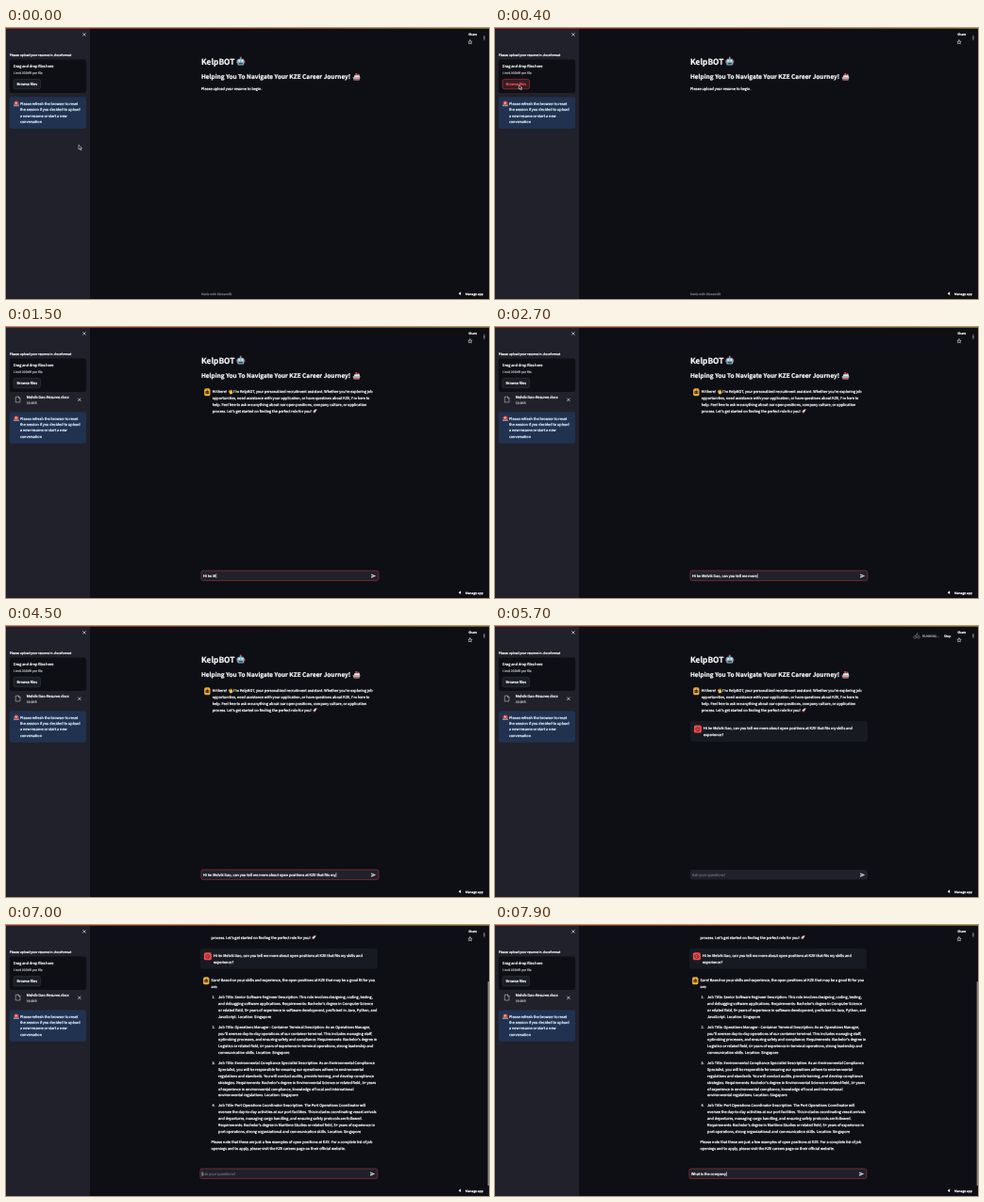
Animation of 512x288 px, one loop 8000 ms. Source, as an HTML page:

```html
<!DOCTYPE html>
<html lang="en">
<head>
<meta charset="utf-8">
<title>Resume chat assistant</title>
<style>
  html, body { margin: 0; width: 100%; height: 100%; overflow: hidden; background: #0d0f15; }
  svg { display: block; width: 100vw; height: 100vh; }
  text {
    font-family: "Noto Sans CJK JP", "Noto Sans CJK SC", "Noto Sans CJK", "Noto Sans", sans-serif;
    color: #fafafa; fill: currentColor; stroke: currentColor; stroke-width: .8;
    white-space: pre; text-rendering: geometricPrecision;
  }
</style>
</head>
<body>
<svg id="stage" viewBox="0 0 1920 1080" xmlns="http://www.w3.org/2000/svg"></svg>
<script>
const LOOP = 8000;
const LINE = 25.6;
const FONT_SCALE = 0.895;
const QUESTION = "Hi Im Melvik Dao, can you tell me more about open positions at KZE that fits my skills and experience?";
const FOLLOW_UP = "What is the company";

const T = {
  click: 250, file: 700, greeting: 900, ready: 1000, focus: 1200,
  submit: 5500, answer: 5800, refocus: 7000, retype: 7100
};

// Markup helpers
const text = (x, y, str, size = 16, attrs = "") =>
  `<text x="${x}" y="${y}" font-size="${size * FONT_SCALE}" ${attrs}>${str}</text>`;
const lines = (x, y, rows, step = LINE, attrs = "") =>
  rows.map((row, i) => text(x, y + i * step, row, 16, attrs)).join("");
const box = (x, y, w, h, fill, r = 8, attrs = "") =>
  `<rect x="${x}" y="${y}" width="${w}" height="${h}" rx="${r}" fill="${fill}" ${attrs}/>`;
const at = (x, y, body, attrs = "") => `<g transform="translate(${x} ${y})" ${attrs}>${body}</g>`;
const stroke = (d, color = "#fafafa", width = 2) =>
  `<path d="${d}" fill="none" stroke="${color}" stroke-width="${width}" stroke-linecap="round" stroke-linejoin="round"/>`;
const shape = (d, fill) => `<path d="${d}" fill="${fill}"/>`;
const dot = (x, y, r, fill) => `<circle cx="${x}" cy="${y}" r="${r}" fill="${fill}"/>`;
const cross = (x, y) => at(x, y, stroke("M-5-5L5 5M5-5L-5 5", "#fafafa", 2.4));

const robot =
  box(-17, -4, 6, 13, "#d9534f", 3) + box(11, -4, 6, 13, "#d9534f", 3) +
  dot(0, -14, 4, "#d9534f") + box(-2, -12, 4, 6, "#b8c4cc", 0) +
  box(-13, -9, 26, 25, "#7fb6cc", 5) +
  dot(-6, -1, 3.5, "#e8f6fa") + dot(6, -1, 3.5, "#e8f6fa") + box(-8, 7, 16, 5, "#324650", 1);
const ship =
  box(-4, -15, 7, 9, "#d94a45", 1) + box(5, -12, 6, 7, "#d94a45", 1) +
  box(-9, -7, 22, 10, "#e3e8ec", 2) + shape("M-15 1H16L11 13H-10Z", "#aab4bd") +
  shape("M-13 8H13L11 13H-10Z", "#c9413e");
const wave =
  `<g transform="rotate(-25)">${box(-6, -3, 13, 12, "#f5bd3d", 5)}` +
  [-6, -2.5, 1, 4.5].map((x, i) => box(x, -9 + Math.abs(i - 1.5), 3, 11, "#f5bd3d", 1.5)).join("") + "</g>";
const rocket =
  `<g transform="rotate(45)">${shape("M0-11Q6-5 4 6H-4Q-6-5 0-11Z", "#d5dae0")}` +
  shape("M-4 1L-8 8L-4 6ZM4 1L8 8L4 6ZM0-11L3-6H-3Z", "#d9453f") + shape("M-2 6H2L0 11Z", "#f6a623") + "</g>";
const siren =
  shape("M-9 5V-3Q-9-11 0-11T9-3V5Z", "#ea4338") + box(-11, 4, 22, 6, "#8a939e", 1) + dot(-1, -3, 3.5, "#ffc4ba");
const botAvatar =
  box(-12, -15, 24, 30, "#eda934", 7) + box(-7, -5, 14, 11, "#3b2b12", 3) +
  dot(-3, 0, 1.8, "#eda934") + dot(3, 0, 1.8, "#eda934") + box(-1, -10, 2, 6, "#3b2b12", 0);
const userAvatar =
  box(-15, -15, 30, 30, "#f04c4c", 7) +
  stroke("M-7-4Q0-11 7-4V2Q6 8 0 8T-7 2Z", "#3c1218", 2.4) + dot(-3, 1, 1.5, "#3c1218") + dot(3, 1, 1.5, "#3c1218");
const runner = dot(4, -9, 2.6, "#85878e") +
  stroke("M2-5L-2 2L4 5L2 11M-2 2L-5 7H-10M-7-1L-4-5H2L6-1H10", "#85878e", 2.2);
const cyclist = dot(3, -9, 2.4, "#85878e") +
  `<g fill="none" stroke="#85878e" stroke-width="2"><circle cx="-7" cy="6" r="5"/><circle cx="8" cy="6" r="5"/></g>` +
  stroke("M1-5L-5-1L1 2L0 7M1-5L5-1H9", "#85878e", 2);

const sidebar =
  box(0, 0, 334, 1080, "#20212a", 0) + cross(311, 26) +
  text(14, 114, "Please upload your resume in .docxformat", 14) +
  box(14, 126, 305, 133, "#0d0f15") +
  text(30, 159, "Drag and drop files here") +
  text(30, 184, "Limit 200MB per file", 14, 'opacity=".65"') +
  box(30, 204, 107, 39, "#1b1d25", 8, 'id="browse" stroke="#484a53" stroke-width="1.5"') +
  text(83.5, 229, "Browse files", 16, 'id="browseLabel" text-anchor="middle"') +
  `<g id="file">` +
    at(48, 289, stroke("M-8-11H2L8-5V11H-8ZM2-11V-5H8", "#d5d6da", 2)) +
    text(82, 286, "Melvik-Dao-Resume.docx") + text(82, 307, "39.6KB", 14, 'opacity=".65"') + cross(292, 290) +
  `</g>` +
  `<g id="notice">` + box(14, 275, 305, 126, "#213250") + at(41, 302, siren) +
    lines(56, 307, ["Please refresh the browser to reset", "the session if you decided to upload",
      "a new resume or start a new", "conversation"], 24, 'style="color:#dcefff"') +
  `</g>`;

const jobs = [
  [77, ["Job Title: Senior Software Engineer Description: This role involves designing, coding, testing,",
    "and debugging software applications. Requirements: Bachelor's degree in Computer Science",
    "or related field, 5+ years of experience in software development, proficient in Java, Python, and",
    "JavaScript. Location: Singapore"]],
  [108.4, ["Job Title: Operations Manager - Container Terminal Description: As an Operations Manager,",
    "you'll oversee day-to-day operations of our container terminal. This includes managing staff,",
    "optimizing processes, and ensuring safety and compliance. Requirements: Bachelor's degree in",
    "Logistics or related field, 6+ years of experience in terminal operations, strong leadership and",
    "communication skills. Location: Singapore"]],
  [147, ["Job Title: Environmental Compliance Specialist Description: As an Environmental Compliance",
    "Specialist, you will be responsible for ensuring our operations adhere to environmental",
    "regulations and standards. You will conduct audits, provide training, and develop compliance",
    "strategies. Requirements: Bachelor's degree in Environmental Science or related field, 3+ years",
    "of experience in environmental compliance, knowledge of local and international",
    "environmental regulations. Location: Singapore"]],
  [192, ["Job Title: Port Operations Coordinator Description: The Port Operations Coordinator will",
    "oversee the day-to-day activities at our port facilities. This includes coordinating vessel arrivals",
    "and departures, managing cargo handling, and ensuring safety protocols are followed.",
    "Requirements: Bachelor's degree in Maritime Studies or related field, 5+ years of experience in",
    "port operations, strong organizational and communication skills. Location: Singapore"]]
];
const SCROLL = 286;
const answerY = y => y * 3.75 + 5 + SCROLL;

const page =
  text(776, 145, "KelpBOT", 35, 'font-weight="600"') + at(933, 132, robot) +
  text(776, 204, "Helping You To Navigate Your KZE Career Journey!", 27, 'font-weight="600"') + at(1393, 195, ship) +
  text(776, 247, "Please upload your resume to begin.", 16, 'id="intro"') +
  `<g id="greeting">` + at(800, 260, botAvatar) +
    text(820, 264, "Hi there!") + at(893, 259, wave) +
    text(905, 264, "I'm KelpBOT, your personalized recruitment assistant. Whether you're exploring job") +
    lines(820, 264 + LINE, ["opportunities, need assistance with your application, or have questions about KZE, I'm here to",
      "help. Feel free to ask me anything about our open positions, company culture, or application",
      "process. Let's get started on finding the perfect role for you!"]) + at(1228, 335, rocket) +
  `</g>` +
  `<g id="question">` + box(776, 379, 705, 82, "#181a22") + at(806, 411, userAvatar) +
    lines(829, 414, [QUESTION.replace(" experience?", ""), "experience?"]) +
  `</g>` +
  `<g id="answer">` + at(800, answerY(59) - 4, botAvatar) +
    lines(820, answerY(59), ["Sure! Based on your skills and experience, the open positions at KZE that may be a good fit for you", "are:"]) +
    jobs.map(([y, rows], i) => text(823, answerY(y), `${i + 1}.`) + lines(848, answerY(y), rows)).join("") +
    lines(820, answerY(231), ["Please note that these are just a few examples of open positions at KZE. For a complete list of job",
      "openings and to apply, please visit the KZE careers page on their official website."]) +
  `</g>`;

const header =
  box(334, 0, 1586, 40, "#0d0f15", 0) +
  text(1838, 29, "Share", 14) +
  at(1845, 56, stroke("M0-8L2.4-2.6L8-2L3.8 1.8L5 7.5L0 4.6L-5 7.5L-3.8 1.8L-8-2L-2.4-2.6Z", "#fafafa", 2)) +
  [-6, 0, 6].map(y => dot(1901, 39 + y, 2.1, "#fafafa")).join("") +
  `<g id="running">` + at(1676, 39, runner, 'id="runner"') + at(1676, 39, cyclist, 'id="cyclist"') +
    text(1699, 44, "RUNNING...", 14, 'opacity=".6"') + text(1785, 44, "Stop", 14) +
  `</g>`;

const footer =
  text(776, 1065, 'Made with <tspan font-weight="600">Streamlit</tspan>', 14, 'id="credit" opacity=".4"') +
  shape("M1799 1058L1808 1051V1065Z", "#fafafa") + text(1826, 1064, "Manage app", 14);

const input =
  `<g id="input">` + box(776, 971, 705, 40, "#20212a", 8, 'id="field" stroke-width="2"') +
    text(784, 997, "", 16, 'id="typed"') +
    `<rect id="caret" y="983" width="2" height="18" fill="#fafafa"/>` +
    at(1461, 992, shape("M-9-8L10 0L-9 8V2L2 0L-9-2Z", "#d5d6da")) +
  `</g>`;

const scrollbar = box(1915, 225, 5, 814, "#85877c", 2, 'id="scrollbar"');
const pointer = `<path id="pointer" d="M0 0V18L4.5 14L8 21L11 19.5L8 13H13Z" fill="#111" stroke="#fff" stroke-width="2"/>`;

document.getElementById("stage").innerHTML =
  `<defs><linearGradient id="strip"><stop stop-color="#b02a2c"/><stop offset=".5" stop-color="#9c421c"/>` +
  `<stop offset="1" stop-color="#857a20"/></linearGradient></defs>` +
  box(0, 0, 1920, 1080, "#0d0f15", 0) + `<g id="page">${page}</g>` + header + sidebar + footer + input +
  scrollbar + box(0, 0, 1920, 3, "url(#strip)", 0) + pointer;

const el = {};
document.querySelectorAll("#stage [id]").forEach(node => el[node.id] = node);

const show = (node, on) => { node.style.display = on ? "" : "none"; };
const ease = p => p * p * (3 - 2 * p);

// Keyframed pointer path: time, x, y
const pointerPath = [[0, 289, 466], [T.click, 95, 226], [500, 95, 226], [750, 1056, 780], [850, 1056, 780], [1100, 1040, 990]];
function pointerAt(t) {
  const next = pointerPath.findIndex(k => k[0] > t);
  if (next < 0) return pointerPath[pointerPath.length - 1].slice(1);
  const [a, b] = [pointerPath[next - 1], pointerPath[next]];
  const p = ease((t - a[0]) / (b[0] - a[0]));
  return [a[1] + (b[1] - a[1]) * p, a[2] + (b[2] - a[2]) * p];
}

function typedChars(t) {
  if (t >= T.retype) return FOLLOW_UP.slice(0, Math.floor((t - T.retype) * 0.0239 + 0.2));
  if (t >= T.submit || t < T.focus) return "";
  const mid = QUESTION.indexOf(" about");
  const late = QUESTION.indexOf(" skills");
  const span = (from, to, start, end) => from + (to - from) * (t - start) / (end - start);
  const count = t < 2700 ? span(0, mid, T.focus, 2700)
    : t < 4500 ? span(mid, late, 2700, 4500)
    : span(late, QUESTION.length, 4500, 5400);
  return QUESTION.slice(0, Math.floor(count + 0.001));
}

function render(t) {
  const answered = t >= T.answer;
  const focused = (t >= T.focus && t < T.submit) || t >= T.refocus;
  const pressed = t >= T.click && t < T.focus;
  const thinking = t >= T.submit && !answered;

  show(el.intro, t < T.greeting);
  show(el.credit, t < T.greeting);
  show(el.greeting, t >= T.greeting);
  show(el.input, t >= T.greeting);
  show(el.file, t >= T.file);
  show(el.question, t >= T.submit);
  show(el.answer, answered);
  show(el.running, (t >= T.file && t < T.ready) || thinking);
  show(el.runner, !thinking);
  show(el.cyclist, thinking);
  show(el.pointer, t < T.focus);
  show(el.scrollbar, t >= T.refocus);

  el.notice.setAttribute("transform", `translate(0 ${t >= T.file ? 63 : 0})`);
  el.page.setAttribute("transform", answered ? `translate(-4 ${-SCROLL})` : "");
  el.input.setAttribute("transform", answered ? "translate(-4 0)" : "");
  el.pointer.setAttribute("transform", `translate(${pointerAt(t).join(" ")})`);

  el.browse.setAttribute("fill", pressed ? "#351c24" : "#1b1d25");
  el.browse.setAttribute("stroke", pressed ? "#ff4b4b" : "#484a53");
  el.browseLabel.style.color = pressed ? "#ff4b4b" : "";

  const typed = typedChars(t);
  el.typed.textContent = typed || "Ask your questions?";
  el.typed.style.color = typed ? "" : "#62646c";
  el.field.setAttribute("stroke", focused ? "#b83c3e" : "none");
  show(el.caret, focused);
  el.caret.setAttribute("x", typed && focused ? 785 + el.typed.getComputedTextLength() : 783);
}

const start = performance.now();
function tick() {
  render((performance.now() - start) % LOOP);
  requestAnimationFrame(tick);
}
tick();
</script>
</body>
</html>
```
